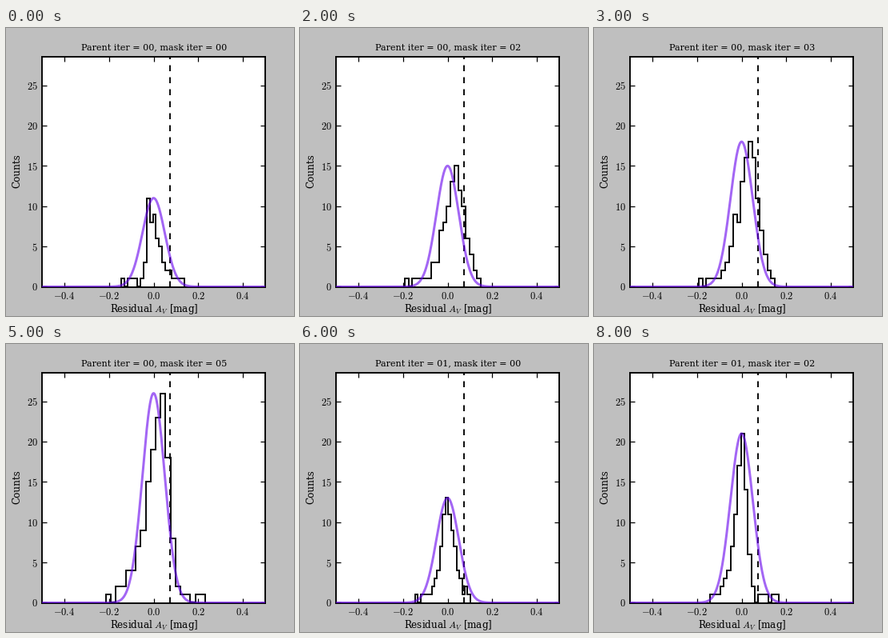
Animation, 360 px wide and 360 px high, one loop 9 s. Source, as a matplotlib script:

```python
import numpy as np
import matplotlib.pyplot as plt
from matplotlib.animation import FuncAnimation

SIZE, DPI = 360, 90
BINS = 20
SIGMA = 0.05
INK = "black"

plt.rcParams.update({
    "font.family": "DejaVu Serif",
    "mathtext.fontset": "cm",
    "axes.linewidth": 1.5,
})


def histogram(lo, hi, peak, mode, left, right):
    """Skewed hump around bin `mode`, with sparse single counts in the tails."""
    k = np.arange(BINS)
    d = k - mode
    hump = peak * np.exp(-(np.abs(d) / np.where(d < 0, left, right)) ** 1.4)
    noise = np.random.default_rng(peak).normal(0, 0.3, BINS) * np.sqrt(hump)
    counts = np.rint(np.clip(hump + noise * (d != 0), 0, peak))
    strays = k % 4 != 1
    return np.maximum(counts, strays), np.linspace(lo, hi, BINS + 1)


# parent, mask, then: range, peak count, peak bin, left and right spread in bins
STEPS = [
    (0, 0, -0.145, 0.138, 11, 8, 0.8, 4.2),
    (0, 1, -0.245, 0.160, 13, 11, 2.6, 4.2),
    (0, 2, -0.192, 0.149, 15, 13, 3.9, 3.0),
    (0, 3, -0.192, 0.149, 18, 13, 3.9, 3.0),
    (0, 4, -0.213, 0.231, 22, 11, 4.0, 1.7),
    (0, 5, -0.213, 0.231, 26, 11, 4.0, 1.7),
    (1, 0, -0.146, 0.102, 13, 11, 2.8, 3.7),
    (1, 1, -0.142, 0.167, 17, 9, 3.0, 1.7),
    (1, 2, -0.142, 0.167, 21, 9, 3.0, 1.7),
]

fig = plt.figure(figsize=(SIZE / DPI, SIZE / DPI), dpi=DPI, facecolor="0.75")
ax = fig.add_axes([0.125, 0.1, 0.775, 0.8])
ax.set(xlim=(-0.5, 0.5), ylim=(-0.06, 28.54))

xticks = np.linspace(-0.4, 0.4, 5)
yticks = range(0, 30, 5)
ax.set_xticks(xticks, [f"${v:.1f}$" for v in xticks])
ax.set_yticks(yticks, [f"${v}$" for v in yticks])
ax.tick_params(direction="in", top=True, right=True, length=4.8, width=1,
               pad=4, labelsize=10)


def put(x, y, text, size, **kw):
    """Place text at pixel (x, y), measured from the top left."""
    kw = {"ha": "center", "va": "baseline", **kw}
    return fig.text(x / SIZE, 1 - y / SIZE, text, fontsize=size, **kw)


title = put(185, 27, "", 8.9)
put(185, 355, r"Residual $A_V$ [mag]", 9.5)
put(14, 178.5, "Counts", 9.6, rotation=90, va="center")

x = np.linspace(-0.5, 0.5, 1000)
bell = np.exp(-0.5 * (x / SIGMA) ** 2)

bars = ax.stairs(np.zeros(BINS), np.linspace(-0.1, 0.1, BINS + 1),
                 color=INK, lw=1.5)
ax.axvline(1.5 * SIGMA, color=INK, lw=1.5, ls=(0, (4, 4)))
curve, = ax.plot(x, bell, color="#6600ee", alpha=0.6, lw=2.4, zorder=3)


def draw(i):
    parent, mask, *shape = STEPS[i]
    counts, edges = histogram(*shape)
    title.set_text(f"Parent iter = {parent:02d}, mask iter = {mask:02d}")
    bars.set_data(counts, edges)
    curve.set_ydata(counts.max() * bell)
    return title, bars, curve


anim = FuncAnimation(fig, draw, frames=len(STEPS), interval=1000,
                     repeat=True, repeat_delay=0, blit=False)
plt.show()
```
